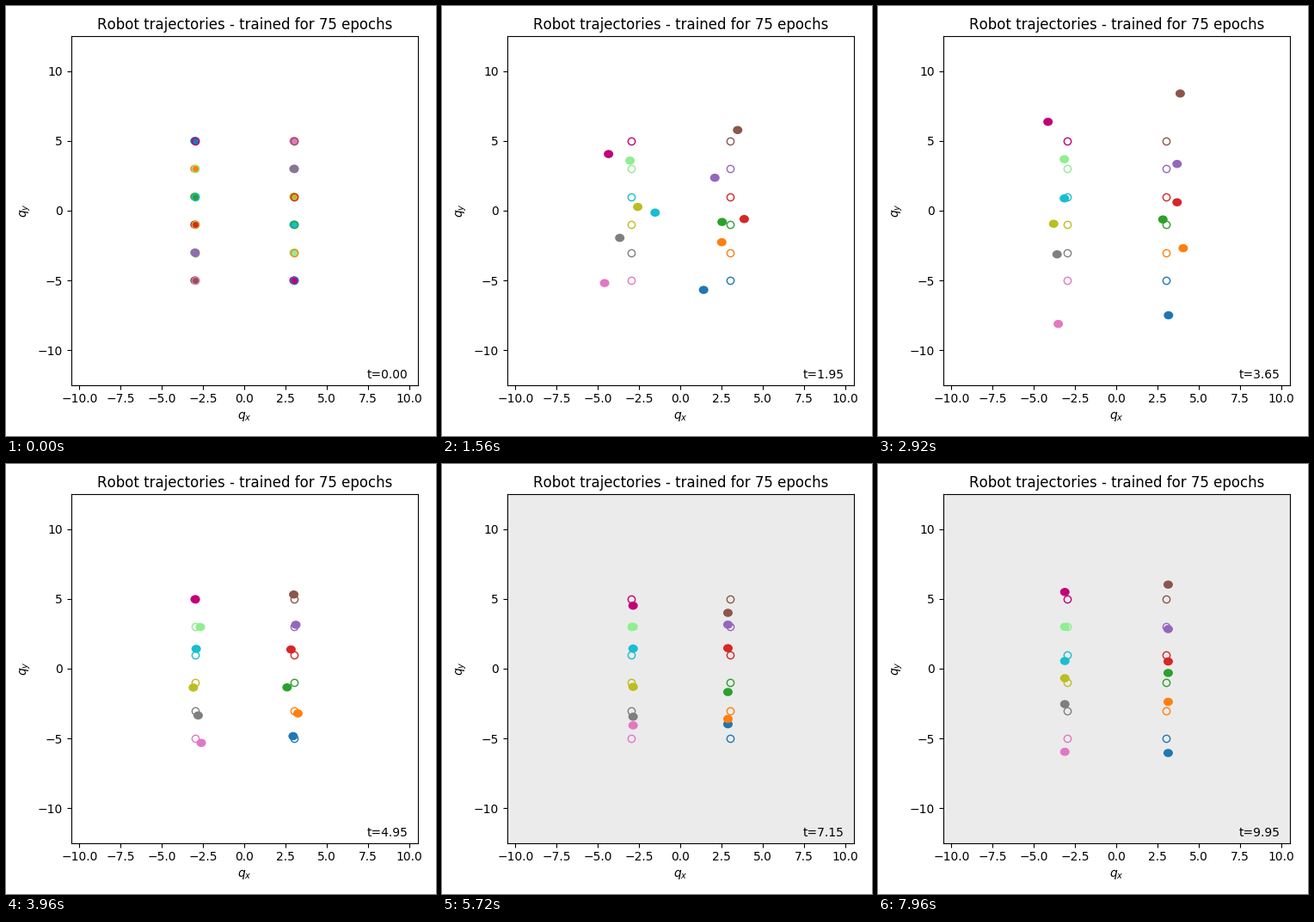
Write a matplotlib script that moves like this. It is 500 px wide and 500 px high and loops after 8 s.

```python
import numpy as np
import matplotlib.pyplot as plt
from matplotlib.animation import FuncAnimation

plt.rcParams["text.kerning_factor"] = 6

FRAMES, INTERVAL, DT = 200, 40, 0.05
SHADE_FROM = 100  # step at which the axes turn grey
SWAY_X = -0.2
PASS, OVERSHOOT = 1.95, 3.65
KEYS = np.array([0, PASS, OVERSHOOT, 5.95, 7.15, 8.65, 9.95])

# Ordered by goal: colour, passing point, overshoot point, vertical sway
ROBOTS = [
    ("tab:blue", (1.40, -5.68), (3.15, -7.50), -1.60),
    ("tab:orange", (2.50, -2.26), (4.04, -2.69), 0.95),
    ("tab:green", (2.52, -0.81), (2.81, -0.63), 1.06),
    ("tab:red", (3.86, -0.60), (3.67, 0.60), 0.74),
    ("tab:purple", (2.08, 2.36), (3.67, 3.35), 0.25),
    ("tab:brown", (3.46, 5.78), (3.86, 8.40), -1.57),
    ("tab:pink", (-4.60, -5.19), (-3.53, -8.12), -1.47),
    ("tab:gray", (-3.68, -1.95), (-3.60, -3.13), 0.70),
    ("tab:olive", (-2.59, 0.27), (-3.81, -0.94), 0.48),
    ("tab:cyan", (-1.54, -0.14), (-3.16, 0.88), 0.69),
    ("lightgreen", (-3.06, 3.59), (-3.16, 3.69), 0.0),
    ("xkcd:magenta", (-4.36, 4.06), (-4.15, 6.37), -0.76),
]


def free_response(t):
    """Unit mass on a damped spring (k = b = 1), released at rest from 1."""
    w = np.sqrt(3) / 2
    return np.exp(-t / 2) * (np.cos(w * t) + np.sin(w * t) / (2 * w))


def settle(t):
    """Slowly fading swing of the robots around their goals."""
    return np.exp(-0.08 * (t - 6)) * np.cos(t - 6.35)


def spline(tk, yk, t):
    """Cubic spline through (tk, yk): flat start, natural end."""
    n = len(tk)
    h = np.diff(tk)
    slope = np.diff(yk, axis=0) / h[:, None]
    a, b = np.zeros((n, n)), np.zeros_like(yk)
    a[0, 0] = 1
    for i in range(1, n - 1):
        a[i, i - 1:i + 2] = h[i], 2 * (h[i - 1] + h[i]), h[i - 1]
        b[i] = 3 * (h[i] * slope[i - 1] + h[i - 1] * slope[i])
    a[-1, -2:] = 1, 2
    b[-1] = 3 * slope[-1]
    d = np.linalg.solve(a, b)

    k = np.clip(np.searchsorted(tk, t, side="right") - 1, 0, n - 2)
    hk = h[k][:, None]
    s = (t - tk[k])[:, None] / hk
    return ((1 + 2 * s) * (1 - s) ** 2 * yk[k]
            + s * (1 - s) ** 2 * hk * d[k]
            + s * s * (3 - 2 * s) * yk[k + 1]
            + s * s * (s - 1) * hk * d[k + 1])


def trajectory(goal, passing, overshoot, sway_y, t):
    """Spring response towards the goal plus a smooth control correction."""
    start = -goal
    sway = np.sign(goal) * (SWAY_X, sway_y)
    tail = goal + sway * settle(KEYS[3:])[:, None]
    path = np.vstack([start, passing, overshoot, tail])

    def free(s):
        return goal + (start - goal) * free_response(s)[:, None]

    return free(t) + spline(KEYS, path - free(KEYS), t)


fig, ax = plt.subplots(figsize=(5, 5), dpi=100)
ax.set(xlim=(-10.5, 10.5), ylim=(-12.5, 12.5),
       xlabel="$q_x$", ylabel="$q_y$",
       title="Robot trajectories - trained for 75 epochs")
fig.tight_layout()
fig.subplots_adjust(top=0.9295)

clock = np.arange(FRAMES) * DT
label = ax.text(7.4, -12, "")
discs, paths = [], []
for i, (color, *motion) in enumerate(ROBOTS):
    side = 1 if i < 6 else -1
    goal = np.array([3.0 * side, 2.0 * (i % 6) - 5])
    paths.append(trajectory(goal, *motion, clock))
    ax.plot(*goal, "o", color=color, fillstyle="none")
    discs.append(ax.add_patch(plt.Circle(-goal, 0.25, color=color)))


def update(frame):
    for disc, path in zip(discs, paths):
        disc.center = path[frame]
    ax.set_facecolor("#ebebeb" if frame >= SHADE_FROM else "white")
    label.set_text(f"t={clock[frame]:.2f}")
    return [*discs, label]


anim = FuncAnimation(fig, update, frames=FRAMES, interval=INTERVAL,
                     repeat=True, repeat_delay=0)
plt.show()
```
